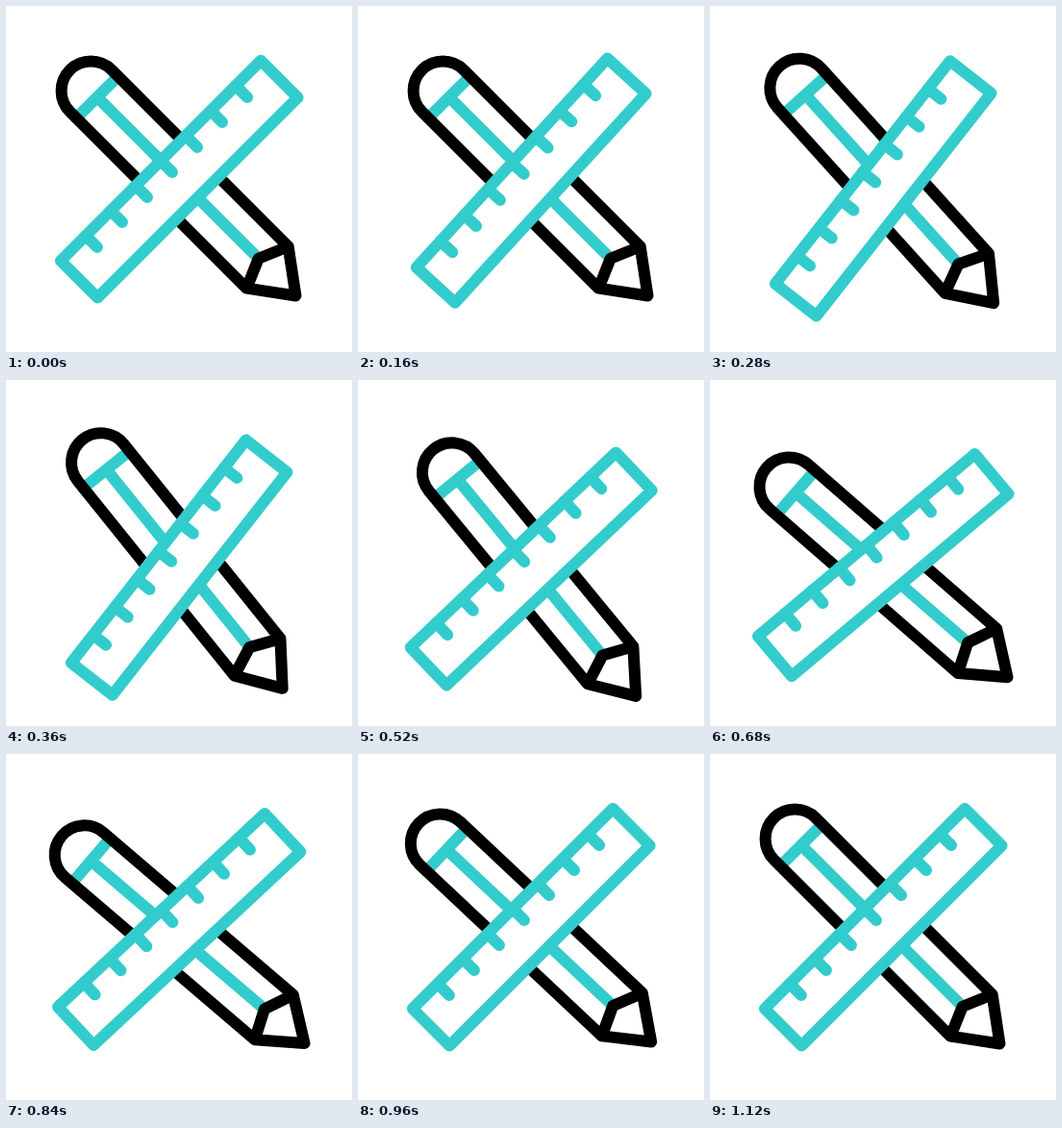
An HTML page for the animation above (1.16 s loop, 360x360 px).

```html
<!DOCTYPE html>
<html lang="en">
<head>
<meta charset="utf-8">
<title>Pencil and ruler</title>
<style>
  html, body { margin: 0; width: 100%; height: 100%; overflow: hidden; background: #fff; }
  svg { display: block; width: 100vw; height: 100vh; }
  path { fill: none; stroke: #3cc; stroke-width: 12; stroke-linecap: round; stroke-linejoin: round; }
  .ink { stroke: #000; }
  .solid { fill: #fff; }
</style>
</head>
<body>
<svg viewBox="0 0 360 360">
  <g id="pencil">
    <path d="M-120.7-30.7V30.7M-120.7 0H114"/>
    <path class="ink" d="M129.8-30.7H-130a30.7 30.7 0 0 0 0 61.4H129.8L171.5 0ZL116.7 0L129.8 30.7"/>
  </g>
  <g id="ruler">
    <path class="solid" d="M-147.3-27.2H147.3V27.2H-147.3Z"/>
    <path id="ticks"/>
  </g>
</svg>
<script>
const LOOP = 1160, STEP = 40, LAG = 113;
const $ = id => document.getElementById(id);

// Keys are [time in ms, value], eased in and out between neighbours.
const tilt = [[60, 0], [300, -7], [345, -7], [620, 5], [660, 5], [975, 0]];
const drop = [[100, 0], [424, 16.4], [557, 16.4], [930, 0]];

function valueAt(keys, t) {
  const i = keys.findIndex(key => key[0] > t);
  if (i < 1) return 0;
  const [t0, a] = keys[i - 1], [t1, b] = keys[i];
  return a + (b - a) * (1 - Math.cos(Math.PI * (t - t0) / (t1 - t0))) / 2;
}

function pose(id, angle, side, t) {
  const turn = angle + side * valueAt(tilt, t);
  $(id).setAttribute('transform', `translate(180.2 ${180.2 + valueAt(drop, t)}) rotate(${turn})`);
}

function draw() {
  const t = Math.floor(performance.now() % LOOP / STEP) * STEP;
  pose('ruler', -45, 1, t);
  pose('pencil', 45, -1, t - LAG);
  requestAnimationFrame(draw);
}

$('ticks').setAttribute('d',
  [-3, -2, -1, 0, 1, 2, 3].map(k => `M${k * 36.8}-27.2v17`).join(''));
draw();
</script>
</body>
</html>
```
